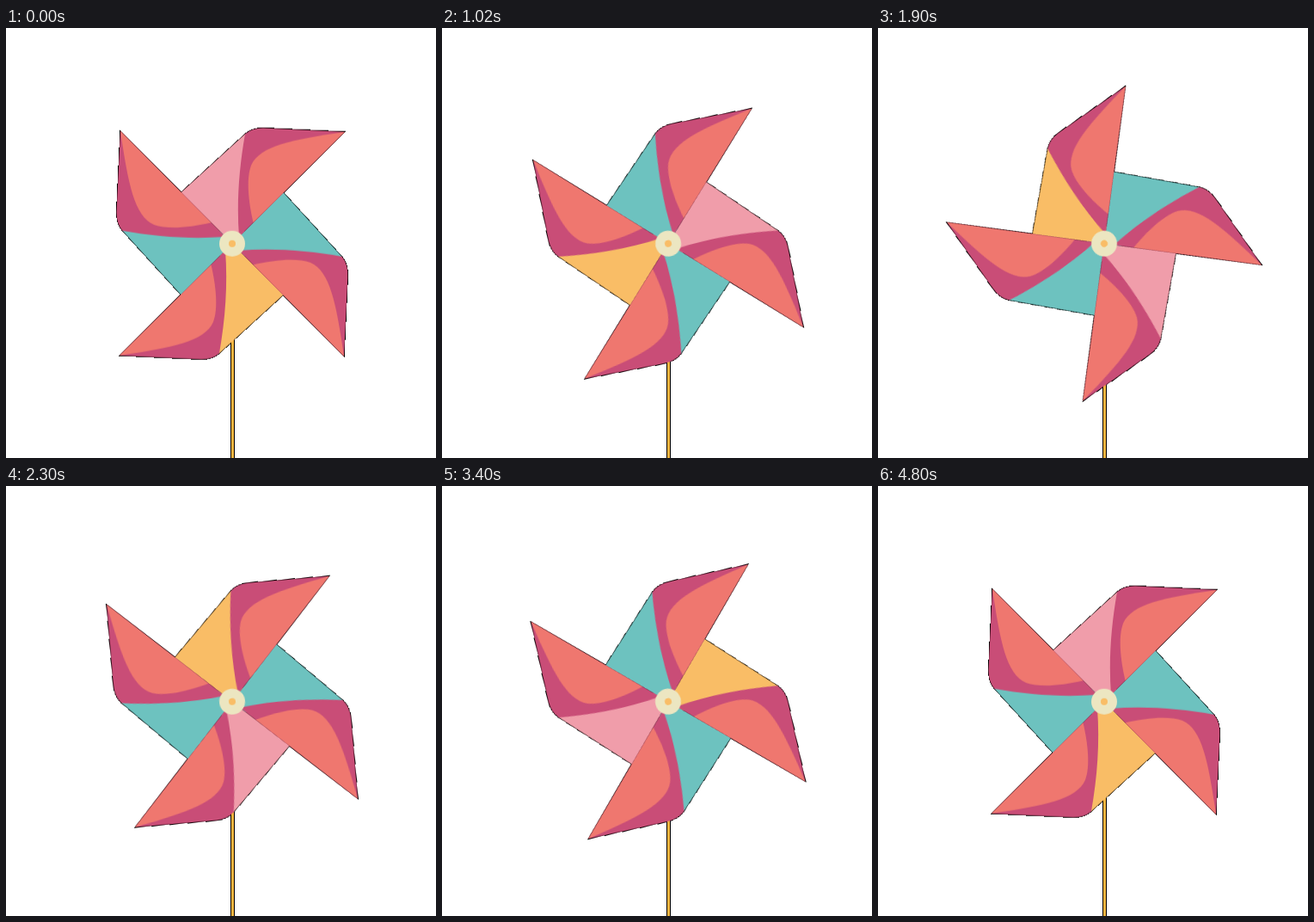
An HTML page without scripts for the animation above (4.82 s loop, 500x500 px).

```html
<!DOCTYPE html>
<html lang="en">
<head>
<meta charset="utf-8">
<title>Pinwheel</title>
<style>
  html, body { margin: 0; width: 100%; height: 100%; overflow: hidden; background: #fff; }
  svg { display: block; width: 100%; height: 100%; }
  .spin { animation: spin 4820ms infinite; }
  /* 240 steps of 1.5deg, 20ms each, then one step of rest */
  @keyframes spin {
    0% { transform: rotate(0deg); animation-timing-function: steps(240, end); }
    99.58506%, 100% { transform: rotate(360deg); }
  }
  .outline { fill: #000; stroke: #000; stroke-width: 1.2; shape-rendering: crispEdges; }
  .pink { fill: #f09daa; }
  .teal { fill: #6dc2bf; }
  .yellow { fill: #f9bd66; }
  .fold { fill: #c94d77; }
  .face { fill: #ef776f; }
  .cream { fill: #ece6c1; }
  .stick { fill: #fbb640; }
</style>
</head>
<body>
<svg viewBox="0 0 500 500">
  <defs>
    <path id="shape" d="M0 0L-59.5-59.5L15-127.5Q24-135.5 40-134.3L131-130Z"/>
    <path id="panel" d="M0 0L-59.5-59.5L15-127.5L20-127L14-14Z"/>
    <g id="blade">
      <path class="fold" d="M131-130L40-134.3Q24-135.5 15-127.5C8-88 5-48 8-8L0 0Z"/>
      <path class="face" d="M131-130L24.5-24.5C19-48 16-75 22-91C32-114 70-121 131-130Z"/>
    </g>
  </defs>

  <rect x="261" y="251" width="5" height="249"/>
  <g transform="translate(263 250.7)">
    <g class="spin outline">
      <use href="#shape"/>
      <use href="#shape" transform="rotate(90)"/>
      <use href="#shape" transform="rotate(180)"/>
      <use href="#shape" transform="rotate(270)"/>
    </g>
  </g>
  <rect class="stick" x="262" y="251" width="3" height="249"/>

  <g transform="translate(263 250.7)">
    <g class="spin">
      <use href="#panel" class="pink"/>
      <use href="#panel" class="teal" transform="rotate(90)"/>
      <use href="#panel" class="yellow" transform="rotate(180)"/>
      <use href="#panel" class="teal" transform="rotate(270)"/>
      <use href="#blade"/>
      <use href="#blade" transform="rotate(90)"/>
      <use href="#blade" transform="rotate(180)"/>
      <use href="#blade" transform="rotate(270)"/>
      <circle class="cream" r="15"/>
      <circle class="yellow" r="4"/>
    </g>
  </g>
</svg>
</body>
</html>
```
